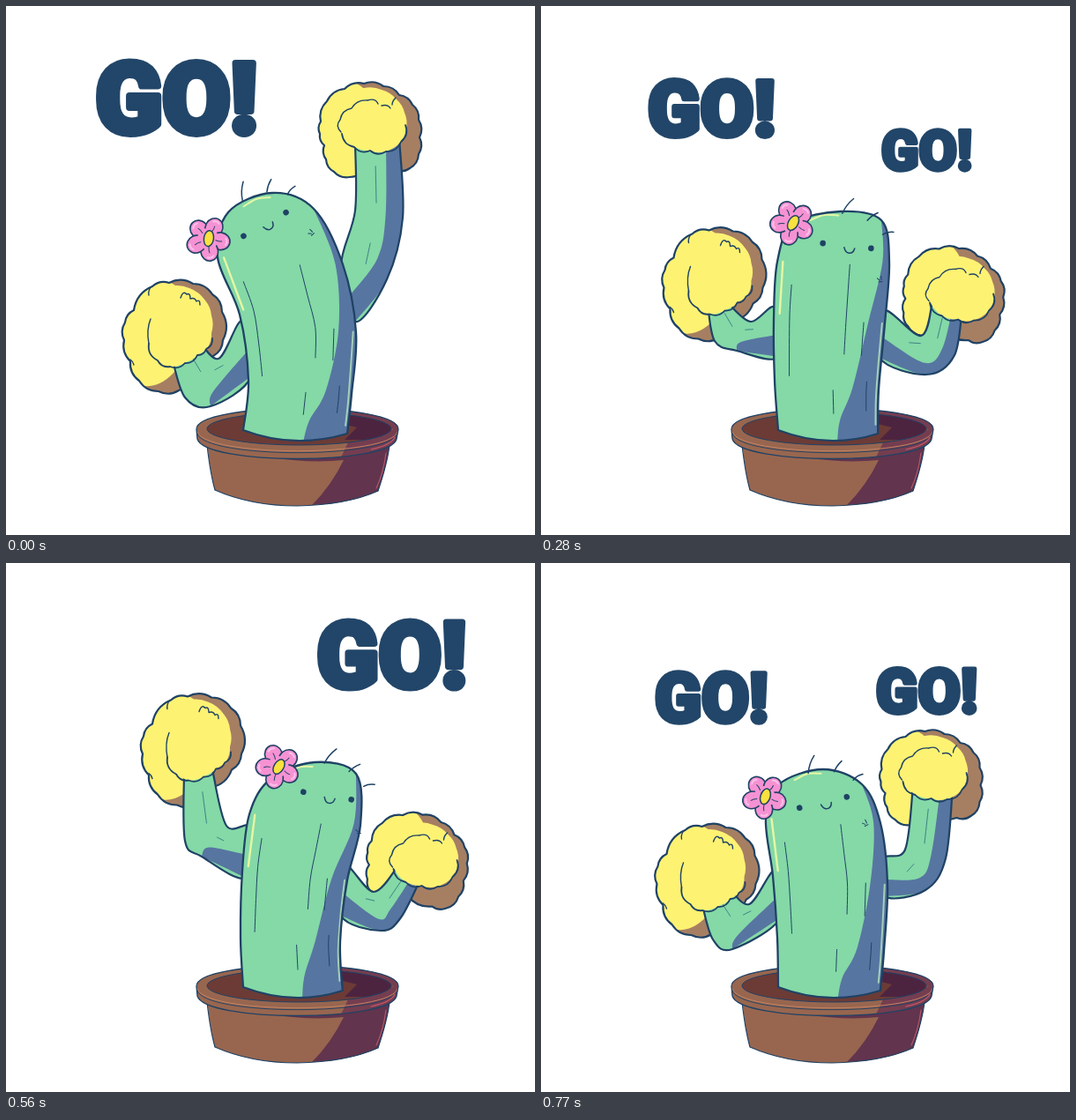
Animation of 600x600 px, one loop 0.84 s. Source, as an HTML page with a canvas:

```html
<!DOCTYPE html>
<html lang="en">
<head>
<meta charset="utf-8">
<title>Cheering cactus</title>
<style>
html, body { margin: 0; width: 100%; height: 100%; overflow: hidden; background: #fff; }
canvas { display: block; width: 600px; height: 600px; }
</style>
</head>
<body>
<canvas id="stage" width="600" height="600"></canvas>
<script>
const ctx = document.getElementById('stage').getContext('2d');
const STEP = 70, STEPS = 12;
const NAVY = '#1f4265', GREEN = '#84d9a7', BLUE = '#5775a1', YELLOW = '#fef273',
  TAN = '#a67f62', PALE = '#e6f6a4', CLAY = '#98664f', PLUM = '#62344d';

// Steps that have a key pose; the others are eased between their neighbours.
const KEYS = [0, 2, 4, 6, 8, 9, 11];

// Left side going up, dome, right side going down
const BODY = [
  [275,425, 265,350, 240,285, 252,234, 302,212, 349,230, 382,293, 397,370, 392,440],
  [273,425, 265,360, 249,290, 264,240, 315,226, 361,241, 382,290, 394,365, 391,440],
  [265,425, 264,355, 268,290, 286,247, 340,233, 386,243, 395,290, 390,360, 383,435],
  [266,430, 270,355, 288,275, 315,227, 360,210, 408,228, 414,290, 381,355, 374,430],
  [266,425, 268,350, 276,285, 300,245, 350,226, 397,239, 402,297, 387,360, 379,430],
  [265,425, 264,355, 267,290, 283,253, 335,236, 383,250, 393,295, 389,360, 384,435],
  [268,425, 263,355, 255,290, 270,251, 320,234, 364,251, 385,295, 393,365, 389,440]
];
// Outer hand, outer elbow (2), shoulder (2), inner elbow, inner hand
const LEFT_ARM = [
  [188,398, 203,444, 232,454, 278,420, 268,357, 241,400, 216,375],
  [184,392, 197,432, 220,444, 274,395, 268,355, 238,390, 212,368],
  [189,338, 197,380, 222,391, 270,398, 266,342, 238,358, 213,338],
  [213,163, 211,262, 230,287, 280,328, 292,271, 261,255, 247,163],
  [202,236, 203,315, 222,333, 272,357, 278,300, 250,298, 234,234],
  [189,341, 197,382, 222,392, 270,398, 266,342, 238,358, 213,341],
  [183,388, 195,427, 217,438, 272,402, 266,348, 236,387, 211,365]
];
const RIGHT_ARM = [
  [446,150, 450,240, 432,310, 396,358, 380,295, 396,232, 396,155],
  [462,215, 456,306, 434,353, 390,370, 388,320, 406,293, 413,215],
  [478,338, 469,396, 437,418, 384,399, 388,345, 431,374, 444,335],
  [468,345, 441,397, 418,412, 370,386, 378,340, 411,362, 442,338],
  [474,350, 448,402, 425,417, 380,400, 384,343, 417,373, 445,343],
  [478,338, 469,396, 437,418, 384,399, 388,345, 431,374, 444,335],
  [467,252, 459,335, 436,371, 390,378, 388,336, 413,325, 422,252]
];
// Left pom x y, right pom x y, right pom turn
const POMS = [
  [190,377, 412,141, 0], [186.5,366.5, 431,206, 0], [195.5,317.5, 467,328, .25],
  [227,142, 462,333, .25], [211,214.5, 465.5,338.5, .25], [195,321, 467,328, .25],
  [187.5,362, 441.5,244, 0]
];
// Face x y, tilt in degrees, flower x y
const FACE = [
  [293.5,247.5, -29, 229,264], [315,263.5, -18, 244.5,261], [347,272, 6, 285,246],
  [381,247.5, 24, 326,215], [364.5,264, 9, 308.5,231], [343.5,273, -2, 285,252],
  [320,271.5, -13, 253.5,265]
];
// Word centre y and width at every step
const LEFT_WORD = [[104.5,183], [104.5,181], [104.5,173], [108,163], [116,144], [170,86],
  [248.5,21], [0,0], [0,0], [198,73], [173,103], [152,128]];
const RIGHT_WORD = [[0,0], [0,0], [0,0], [205,52], [163.5,103], [128,142],
  [108,165], [104.5,170], [104.5,169], [105,164], [119,145], [145,115]];

const pairs = a => a.reduce((out, v, i) => (i % 2 ? out[out.length - 1].push(v) : out.push([v]), out), []);
const mix = (a, b, t) => [a[0] + (b[0] - a[0]) * t, a[1] + (b[1] - a[1]) * t];

function pose(rows, step) {
  const n = KEYS.length, exact = KEYS.indexOf(step);
  if (exact >= 0) return rows[exact];
  const i = KEYS.indexOf(step - 1);
  const row = j => rows[(j + n) % n];
  const time = j => KEYS[(j + n) % n] + STEPS * Math.floor(j / n);
  const slope = (j, c) => (row(j + 1)[c] - row(j - 1)[c]) / (time(j + 1) - time(j - 1));
  return row(i).map((v, c) => (v + row(i + 1)[c]) / 2 + (slope(i, c) - slope(i + 1, c)) / 4);
}

// Smooth open curve through points
function curve(pts, path = new Path2D(), join = false) {
  if (join) path.lineTo(...pts[0]); else path.moveTo(...pts[0]);
  for (let i = 0; i < pts.length - 1; i++) {
    const a = pts[i - 1] || pts[i], b = pts[i], c = pts[i + 1], d = pts[i + 2] || c;
    path.bezierCurveTo(b[0] + (c[0] - a[0]) / 6, b[1] + (c[1] - a[1]) / 6,
      c[0] - (d[0] - b[0]) / 6, c[1] - (d[1] - b[1]) / 6, c[0], c[1]);
  }
  return path;
}

// Row of outward bumps between clockwise points
function bumps(pts, closed, size = .36) {
  const path = new Path2D(), n = pts.length;
  path.moveTo(...pts[0]);
  for (let i = 0; i < (closed ? n : n - 1); i++) {
    const a = pts[i], b = pts[(i + 1) % n], m = mix(a, b, .5);
    path.quadraticCurveTo(m[0] + (b[1] - a[1]) * size, m[1] - (b[0] - a[0]) * size, b[0], b[1]);
  }
  return path;
}

const fill = (path, color) => { ctx.fillStyle = color; ctx.fill(path); };
const line = (path, width = 1, color = NAVY) => {
  ctx.strokeStyle = color; ctx.lineWidth = width; ctx.stroke(path);
};
const svg = (d, color, width) => {
  const path = new Path2D(d);
  if (width) line(path, width, color); else fill(path, color);
};
function oval(x, y, rx, ry, turn = 0) {
  const path = new Path2D();
  path.ellipse(x, y, rx, ry, turn, 0, 7);
  return path;
}
function within(path, draw) {
  ctx.save(); ctx.clip(path); draw(); ctx.restore();
}
function at(x, y, turn, draw) {
  ctx.save(); ctx.translate(x, y); ctx.rotate(turn); draw(); ctx.restore();
}

const POM_L = {
  back: bumps(pairs([-45,-32, -24,-59, -5,-63, 22,-62, 44,-50, 55,-30, 56,2, 45,20, 22,40,
    6,59, -17,60, -39,48, -49,26, -56,2, -55,-18]), true, .28),
  front: bumps(pairs([-43,-28, -22,-54, -4,-59, 18,-57, 36,-43, 43,-26, 43,-6, 39,10, 28,18,
    14,27, -3,32, -18,24, -28,5, -50,0, -50,-18]), true, .16),
  hem: bumps(pairs([44,0, 37,12, 27,19, 13,28, -4,32, -18,25, -28,6]), false),
  light: oval(-23, -6, 42, 61, .22),
  marks: 'M8-46q3-9 7-4q4-2 4 5q5-2 7 3q4-3 4 4M-28 6q-3-16 2-28M-49 24q3 2 4 6M-26-58q-3 5-2 9'
};
const POM_R = {
  back: bumps(pairs([-55,-10, -48,-33, -28,-47, -6,-53, 16,-50, 34,-40, 49,-29, 56,-12, 57,8,
    56,27, 46,43, 30,45, 0,40, -22,53, -40,47, -49,33, -51,17, -56,4]), true, .28),
  front: bumps(pairs([-45,-27, -26,-42, -6,-48, 14,-46, 31,-35, 40,-20, 42,-2, 35,14, 18,24,
    0,23, -18,18, -30,4, -48,0]), true, .16),
  hem: bumps(pairs([41,-6, 36,13, 19,24, 1,23, -17,19, -31,4]), false),
  light: oval(-29, 0, 38, 56, .1),
  marks: 'M-32 2q-7-7-1-14q2-11 13-13q6-10 18-9q9-3 12 4M30-37q-4 4-4 8M14-28q7-2 10 3'
};

function pomBack(pom) {
  fill(pom.back, TAN);
  within(pom.back, () => fill(pom.light, YELLOW));
  line(pom.back, 2.2);
}
function pomFront(pom) {
  fill(pom.front, YELLOW);
  line(pom.hem, 1.8);
  svg(pom.marks, NAVY, 1.4);
}

function arm(flat, shadeHand) {
  const p = pairs(flat), shape = curve(p);
  fill(shape, GREEN);
  within(shape, () => {
    const shade = curve(shadeHand ? p.slice(0, 4) : p.slice(2, 4));
    const edge = [mix(p[3], p[4], .45), mix(p[2], p[5], .3)];
    if (shadeHand) edge.push(mix(p[1], p[5], .36), mix(p[0], p[6], .3));
    else edge.push(p[2]);
    fill(curve(edge, shade, true), BLUE);
  });
  const a = mix(p[1], p[5], .55), b = mix(p[0], p[6], .55), c = mix(p[2], p[4], .5);
  line(curve([mix(a, b, .65), mix(a, b, .15)]), 1, '#3f7f86');
  line(curve([mix(a, c, .5), mix(a, c, .85)]), 1, '#3f7f86');
  line(shape, 2.2);
}

function pot() {
  svg('M228 494C230 515 233 535 237 549Q278 567 330 567Q386 566 422 550C428 532 433 515 435 494Z', CLAY);
  svg('M300 512Q390 514 435 496C433 515 428 532 422 550Q392 564 347 566Q369 544 383 515Q345 519 300 512Z', PLUM);
  svg('M228 498C230 515 233 535 237 549Q278 567 330 567Q386 566 422 550C428 532 433 515 435 498', NAVY, 1.2);
  svg('M431 507Q428 530 420 547', '#b4566a', 1.2);
  const rim = new Path2D('M216 480C216 449 445 449 445 480L443 491C436 521 225 521 217 491Z');
  fill(rim, CLAY);
  within(rim, () => svg('M388 495L376 520H450V462Q425 452 340 455L350 466L440 480Z', '#753d50'));
  svg('M217 483C224 512 437 512 444 483', '#c28364', 1);
  svg('M217 485C224 514 437 514 444 485', NAVY, .9);
  const soil = oval(332.5, 479.5, 104.5, 18.5);
  fill(soil, '#6c3b36');
  within(soil, () => svg('M250 455H440V492L384 492L398 478Q330 460 250 466Z', '#4d2440'));
  line(soil, 1);
  line(rim, 1.3);
  svg('M441 489Q437 498 414 503', '#c2586c', 1.2);
}

function body(flat, tilt) {
  const p = pairs(flat);
  const all = [[269, 481], ...p, [383 - tilt * .14, 485]];
  const shape = curve(all);
  shape.quadraticCurveTo(326, 503, 269, 481);
  // Point at height v (0 to 3) and share u of the width
  const spot = (u, v) => {
    const i = Math.min(2, Math.floor(v)), f = v - i;
    return mix(mix(all[i], all[i + 1], f), mix(all[10 - i], all[9 - i], f), u);
  };
  const crease = (u, from, to, width, color) =>
    line(curve([0, .33, .67, 1].map(f => spot(u, from + (to - from) * f))), width, color);

  fill(shape, GREEN);
  within(shape, () => {
    const edge = curve([[336, 500], spot(.62, .25), spot(.75, 1), spot(.85, 2), spot(.94, 3), p[5]]);
    edge.lineTo(450, 230);
    edge.lineTo(450, 500);
    fill(edge, BLUE);
    crease(.975, .2, 2, 2, '#a4cfb8');
  });
  crease(.14, 2.6, 1.1);
  crease(.65, 2.95, 1.5);
  crease(.56, .9, .4);
  crease(.81, 2, 1.5);
  crease(.88, 1.1, .5);
  crease(.05, 3, 2.1, 2.4, PALE);
  const a = mix(p[3], p[4], .35), b = mix(p[3], p[4], .95), m = mix(a, b, .5);
  line(curve([[a[0], a[1] + 1], [m[0], m[1] - 1], [b[0], b[1] + 4]]), 2, PALE);
  line(shape, 2.3);
}

function face() {
  fill(oval(-27.5, 0, 3.3, 3.3), NAVY);
  fill(oval(27.5, 0, 3.3, 3.3), NAVY);
  svg('M-3 2Q-1 8 3 8Q8 8 9 2', NAVY, 1.5);
  svg('M-9-36Q-6-46 2-54M20-31Q24-37 31-41M39-17Q44-21 51-21', NAVY, 1.5);
  svg('M38 33l3 2M42 30l1 4M40 37l4-1', NAVY, 1);
}

function flower() {
  for (let i = 0; i < 5; i++) {
    at(0, 0, i * Math.PI * .4 - .45, () => {
      const petal = oval(0, -14.5, 9.8, 10.8);
      fill(petal, '#f692d3');
      line(petal, 1.6);
    });
  }
  fill(oval(0, 0, 12, 12), '#f692d3');
  for (let i = 0; i < 5; i++) {
    at(0, 0, i * Math.PI * .4 - .45, () => {
      svg('M-4-20Q-1-23 3-21', '#fbc0e8', 2);
      svg('M0-9Q1-13 0-16', NAVY, 1);
    });
  }
  const heart = oval(1, 0, 5.5, 9, .45);
  fill(heart, '#f9e13f');
  line(heart, 1.5);
}

function word(x, [y, width]) {
  if (!width) return;
  ctx.save();
  ctx.font = '900 100px Roboto, sans-serif';
  ctx.textAlign = 'left';
  const m = ctx.measureText('GO!'), edge = 7;
  const ink = m.actualBoundingBoxLeft + m.actualBoundingBoxRight;
  const size = width / (ink + edge);
  ctx.translate(x, y);
  ctx.scale(size, size);
  ctx.fillStyle = ctx.strokeStyle = '#224669';
  ctx.lineWidth = edge;
  const left = m.actualBoundingBoxLeft - ink / 2;
  ctx.strokeText('GO!', left, 35.5);
  ctx.fillText('GO!', left, 35.5);
  ctx.restore();
}

function draw(step) {
  ctx.fillStyle = '#fff';
  ctx.fillRect(0, 0, 600, 600);
  ctx.lineJoin = ctx.lineCap = 'round';
  const [lx, ly, rx, ry, turn] = pose(POMS, step);
  const [fx, fy, tilt, px, py] = pose(FACE, step);
  const rad = tilt * Math.PI / 180;

  word(193.5, LEFT_WORD[step]);
  word(437.5, RIGHT_WORD[step]);
  pot();
  at(lx, ly, 0, () => pomBack(POM_L));
  at(rx, ry, turn, () => pomBack(POM_R));
  arm(pose(LEFT_ARM, step), false);
  arm(pose(RIGHT_ARM, step), true);
  at(lx, ly, 0, () => pomFront(POM_L));
  at(rx + turn * 20, ry + turn * 18, 0, () => pomFront(POM_R));
  body(pose(BODY, step), tilt);
  at(fx, fy, rad, face);
  at(px, py, rad * .6, flower);
}

const start = performance.now();
function tick() {
  draw(Math.floor((performance.now() - start) / STEP) % STEPS);
  requestAnimationFrame(tick);
}
tick();
</script>
</body>
</html>
```
